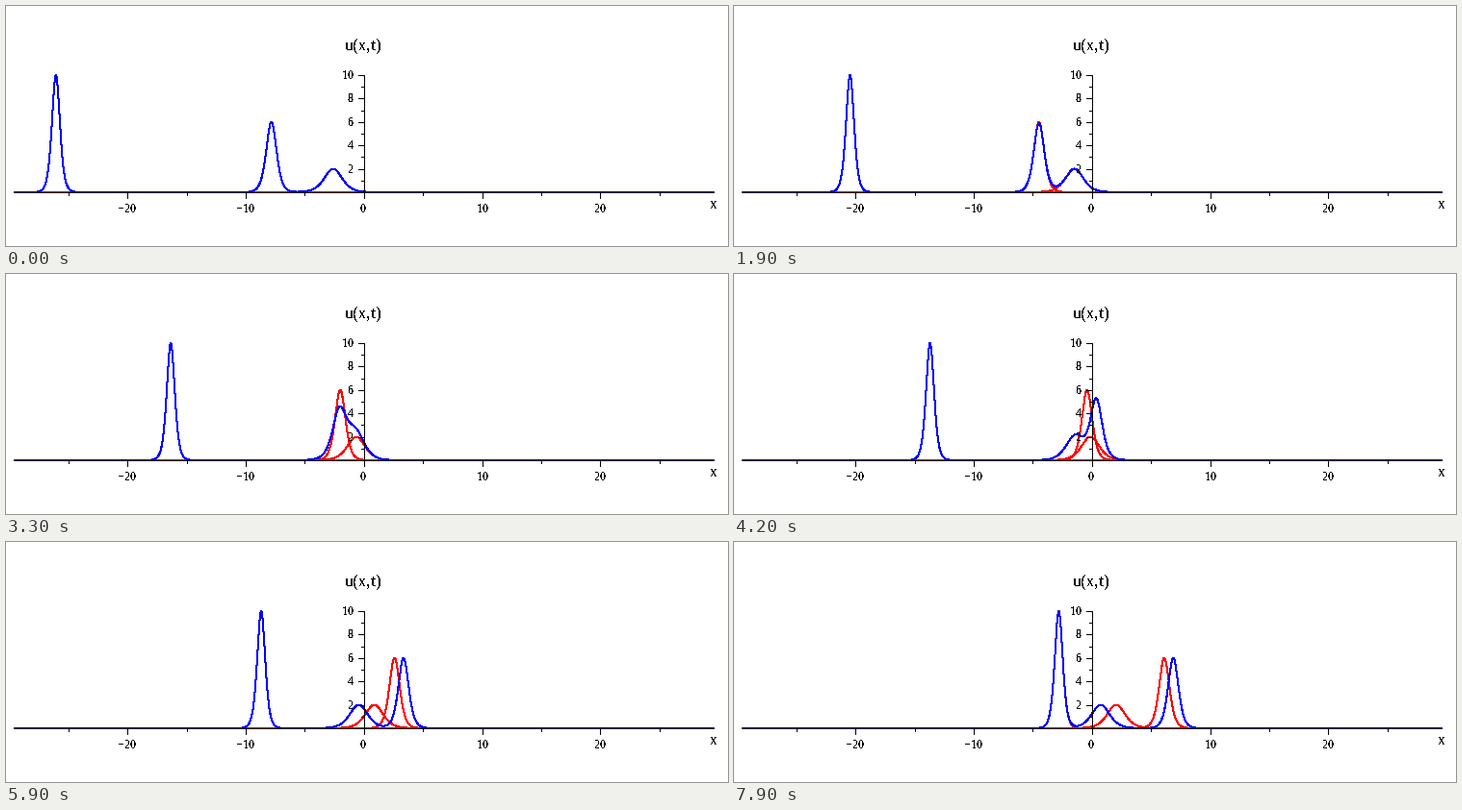
Recreate the animation shown at these times as a matplotlib script. Size 750 by 250 pixels, loop 8000 ms.

```python
from itertools import product

import numpy as np
import matplotlib.pyplot as plt
from matplotlib.animation import FuncAnimation

# Three solitons of the KdV equation u_t + 6 u u_x + u_xxx = 0
W, H, DPI = 750, 250, 100
FRAMES, INTERVAL = 80, 100
T0, DT = -0.654, 0.01472
X0, XS = 372, 12.275        # pixel of x = 0, pixels per unit
Y0, YS = 193.9, 12.2
AXIS_ROW = 194
PX = 72 / DPI

AMPS = np.array([10.0, 6.0, 2.0])   # ordered left to right before collision
START = np.array([-13.0, 0.0, 0.0])
K = np.sqrt(AMPS / 2)
x = np.linspace(-29.6, 29.6, 2400)


def pair(i, j):
    return 2 * np.log(abs(K[i] - K[j]) / (K[i] + K[j]))


SUBSETS = np.array(list(product((0, 1), repeat=3)))
RATES = SUBSETS @ (2 * K)
COUPLING = np.array([sum(m[i] * m[j] * pair(i, j)
                         for i in range(3) for j in range(i))
                     for m in SUBSETS])
PHASE = np.array([sum(pair(i, j) for j in range(i)) for i in range(3)])


def centers(t):
    return START + 2 * AMPS * t


def lone(t):
    return [a / np.cosh(np.clip(k * (x - c), -40, 40)) ** 2
            for a, k, c in zip(AMPS, K, centers(t))]


def combined(t):
    # 2 (ln tau)'' is twice the variance of the exponential rates
    eta = 2 * K[:, None] * (x - centers(t)[:, None]) - PHASE[:, None]
    e = SUBSETS @ eta + COUPLING[:, None]
    p = np.exp(e - e.max(axis=0))
    p /= p.sum(axis=0)
    mean = RATES @ p
    return 2 * (p * (RATES[:, None] - mean) ** 2).sum(axis=0)


def px(v):
    return X0 + XS * v


def py(v):
    return Y0 - YS * v


plt.rcParams["font.family"] = "Liberation Serif"
plt.rcParams["text.hinting"] = "default"
plt.rcParams["text.hinting_factor"] = 1
fig = plt.figure(figsize=(W / DPI, H / DPI), dpi=DPI, facecolor="white")
ax = fig.add_axes([0, 0, 1, 1])
ax.set_xlim(0, W)
ax.set_ylim(H, 0)
ax.axis("off")


def stroke(xs, ys):
    # Whole pixel coordinates snap to that very row or column
    ax.plot(xs, ys, color="black", lw=PX, zorder=4, snap=True,
            antialiased=False, solid_capstyle="butt")


def label(xp, yp, s, size=13, ha="center"):
    ax.text(xp, yp, s, fontsize=size * PX, ha=ha, va="baseline", zorder=5,
            antialiased=False)


def curve(color, z):
    # Without antialiasing every touched pixel is filled, so this is 2 px wide
    return ax.plot([], [], color=color, lw=PX, zorder=z, snap=False,
                   antialiased=False)[0]


stroke([8, 735], [AXIS_ROW] * 2)
stroke([X0, X0], [72, AXIS_ROW])
for v in range(-25, 30, 5):
    major = v % 10 == 0
    col = np.floor(px(v) + 0.25)
    stroke([col, col], [AXIS_ROW, AXIS_ROW + (6 if major else 3)])
    if major:
        label(col - (1.5 if v == 0 else 0), 215,
              str(v).replace("-", "\u2212"))
for v in range(1, 11):
    major = v % 2 == 0
    row = np.floor(AXIS_ROW - YS * v + 0.5)
    stroke([X0 - (6 if major else 3), X0], [row, row])
    if major:
        label(361, row + 4, str(v), ha="right")
label(371.5, 46, "u(x,t)", 18)
label(735, 211, "x", 18)

reds = [curve("#ff0000", 2) for _ in AMPS]
blue = curve("#0000ff", 3)


def draw(n):
    t = T0 + DT * n
    for line, u in zip(reds, lone(t)):
        line.set_data(px(x), py(u))
    blue.set_data(px(x), py(combined(t)))
    return [*reds, blue]


anim = FuncAnimation(fig, draw, frames=FRAMES, interval=INTERVAL,
                     repeat=True, repeat_delay=0, blit=False)
plt.show()
```
